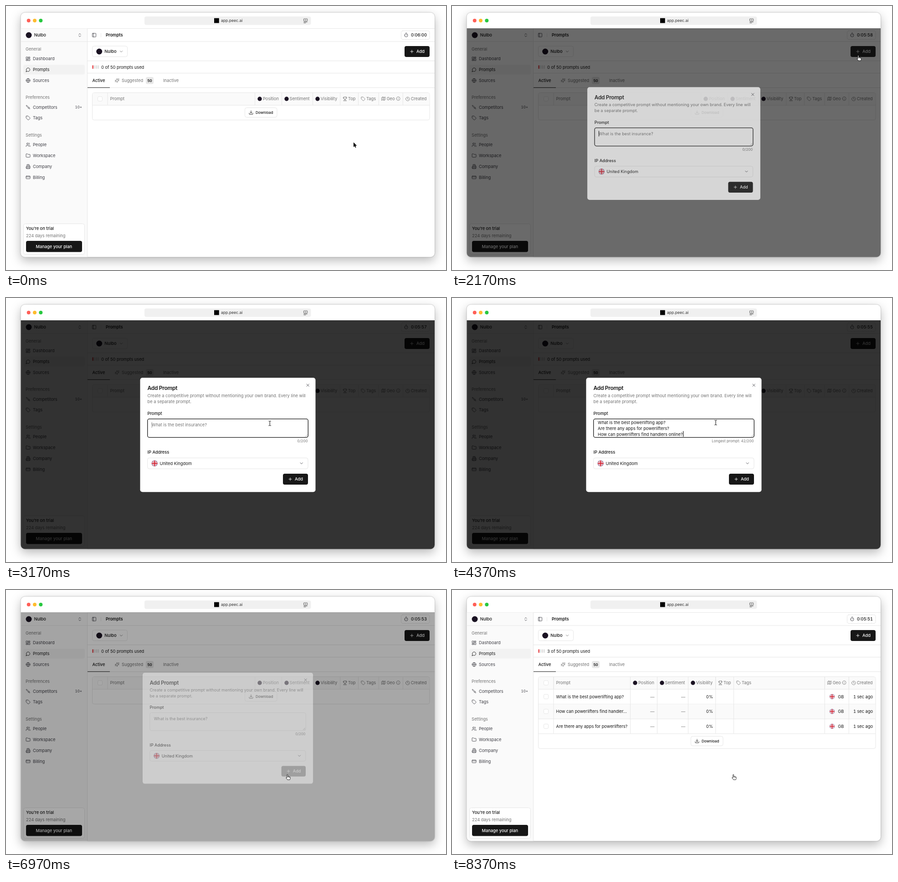
These frames come from a looping animation (966 px wide and 580 px high, 8.4 s). An HTML page:

```html
<!DOCTYPE html>
<html lang="en">
<head>
<meta charset="utf-8">
<title>Add prompts</title>
<style>
  html, body { margin: 0; width: 100%; height: 100%; overflow: hidden; background: #fff; }
  svg { display: block; width: 100%; height: 100%; }
  text { font-family: Inter, "Open Sans", sans-serif; white-space: pre; }
  .num { font-variant-numeric: tabular-nums; }
  .shadow { filter: drop-shadow(0 0 .8px rgba(0,0,0,.35)) drop-shadow(0 8px 11px rgba(0,0,0,.27)); }
</style>
</head>
<body>
<svg id="stage" viewBox="0 0 966 580"></svg>
<script>
const LOOP = 8400, BRAND = 'Nulbo';
const INK = '#171717', BODY = '#3f3f46', MUTED = '#737373', LINE = '#e6e6e6', AVATAR = '#1a1222';

const ICONS = {
  dash: 'M3 3h7v9H3zM14 3h7v5h-7zM14 12h7v9h-7zM3 16h7v5H3z',
  chat: 'M7.9 20A9 9 0 1 0 4 16.1L2 22Z',
  globe: 'M2 12a10 10 0 1 0 20 0a10 10 0 1 0-20 0h20M12 2a14.5 14.5 0 0 0 0 20a14.5 14.5 0 0 0 0-20',
  sword: 'M14.5 17.5 3 6V3h3l11.5 11.5M13 19l6-6M16 16l4 4M19 21l2-2',
  tag: 'M12.6 2.6A2 2 0 0 0 11.2 2H4a2 2 0 0 0-2 2v7.2a2 2 0 0 0 .6 1.4l8.7 8.7a2.4 2.4 0 0 0 3.4 0l6.6-6.6a2.4 2.4 0 0 0 0-3.4zM7.5 7.5h.01',
  users: 'M16 21v-2a4 4 0 0 0-4-4H6a4 4 0 0 0-4 4v2M5 7a4 4 0 1 0 8 0a4 4 0 1 0-8 0M22 21v-2a4 4 0 0 0-3-3.9M16 3.1a4 4 0 0 1 0 7.8',
  folder: 'M20 20a2 2 0 0 0 2-2V8a2 2 0 0 0-2-2h-7.9a2 2 0 0 1-1.7-.9l-.8-1.2A2 2 0 0 0 7.9 3H4a2 2 0 0 0-2 2v13a2 2 0 0 0 2 2Z',
  office: 'M6 22V4a2 2 0 0 1 2-2h8a2 2 0 0 1 2 2v18ZM6 12H4a2 2 0 0 0-2 2v6a2 2 0 0 0 2 2h2M18 9h2a2 2 0 0 1 2 2v9a2 2 0 0 1-2 2h-2M10 6h4M10 10h4M10 14h4M10 18h4',
  card: 'M4 5h16a2 2 0 0 1 2 2v10a2 2 0 0 1-2 2H4a2 2 0 0 1-2-2V7a2 2 0 0 1 2-2ZM2 10h20',
  panel: 'M5 3h14a2 2 0 0 1 2 2v14a2 2 0 0 1-2 2H5a2 2 0 0 1-2-2V5a2 2 0 0 1 2-2ZM9 3v18',
  timer: 'M10 2h4M12 14l3-3M4 14a8 8 0 1 0 16 0a8 8 0 1 0-16 0',
  plus: 'M5 12h14M12 5v14',
  down: 'M6 9l6 6 6-6',
  sort: 'M7 15l5 5 5-5M7 9l5-5 5 5',
  spark: 'M9.9 15.5A2 2 0 0 0 8.5 14.1l-6.1-1.6a.5.5 0 0 1 0-1L8.5 9.9A2 2 0 0 0 9.9 8.5l1.6-6.1a.5.5 0 0 1 1 0l1.6 6.1a2 2 0 0 0 1.4 1.4l6.1 1.6a.5.5 0 0 1 0 1l-6.1 1.6a2 2 0 0 0-1.4 1.4l-1.6 6.1a.5.5 0 0 1-1 0zM20 3v4M22 5h-4M4 17v2M5 18H3',
  save: 'M21 15v4a2 2 0 0 1-2 2H5a2 2 0 0 1-2-2v-4M7 10l5 5 5-5M12 15V3',
  trophy: 'M6 9H4.5a2.5 2.5 0 0 1 0-5H6M18 9h1.5a2.5 2.5 0 0 0 0-5H18M4 22h16M10 14.7V17c0 .6-.5 1-1 1.2C7.9 18.8 7 20.2 7 22M14 14.7V17c0 .6.5 1 1 1.2C16.1 18.8 17 20.2 17 22M18 2H6v7a6 6 0 0 0 12 0V2Z',
  map: 'M3 6l6-3 6 3 6-3v15l-6 3-6-3-6 3ZM9 3v15M15 6v15',
  info: 'M2 12a10 10 0 1 0 20 0a10 10 0 1 0-20 0M12 16v-4M12 8h.01',
  clock: 'M2 12a10 10 0 1 0 20 0a10 10 0 1 0-20 0M12 6v6l4 2',
  close: 'M18 6 6 18M6 6l12 12'
};

// Markup helpers; text and icons are placed by their vertical centre.
const text = (x, cy, s, { fill = INK, size = 9.28, w = 400, anchor = 'start', extra = '' } = {}) =>
  `<text x="${x}" y="${cy + size * .364}" font-size="${size}" font-weight="${w}" fill="${fill}" text-anchor="${anchor}" ${extra}>${s}</text>`;
const rect = (x, y, w, h, fill, r = 0, extra = '') =>
  `<rect x="${x}" y="${y}" width="${w}" height="${h}" rx="${r}" fill="${fill}" ${extra}/>`;
const box = (x, y, w, h, r = 4, extra = '') => rect(x, y, w, h, '#fff', r, `stroke="${LINE}" ${extra}`);
const dot = (x, y, r, fill) => `<circle cx="${x}" cy="${y}" r="${r}" fill="${fill}"/>`;
const hline = (x1, x2, y, c = LINE) => `<path d="M${x1} ${y}H${x2}" stroke="${c}"/>`;
const vline = (x, y1, y2, c = LINE) => `<path d="M${x} ${y1}V${y2}" stroke="${c}"/>`;
const icon = (name, cx, cy, color = BODY, size = 10.6) =>
  `<path d="${ICONS[name]}" transform="translate(${cx - size / 2} ${cy - size / 2}) scale(${size / 24})" fill="none" stroke="${color}" stroke-width="2" stroke-linecap="round" stroke-linejoin="round"/>`;
const flag = (cx, cy, r) => `<g transform="translate(${cx} ${cy}) scale(${r / 10})" clip-path="url(#disc)">
  <rect x="-10" y="-10" width="20" height="20" fill="#25408f"/>
  <path d="M-10-10 10 10M10-10-10 10" stroke="#fff" stroke-width="4.4"/>
  <path d="M-10-10 10 10M10-10-10 10" stroke="#d22f3f" stroke-width="1.6"/>
  <path d="M-10 0H10M0-10V10" stroke="#fff" stroke-width="6.4"/>
  <path d="M-10 0H10M0-10V10" stroke="#d22f3f" stroke-width="3.6"/></g>`;
const addButton = (id, x, y) => `<g id="${id}">${rect(x, y, 55, 24, INK, 4)}
  ${icon('plus', x + 16, y + 12, '#fff')}${text(x + 26, y + 12, 'Add', { fill: '#fff', w: 500 })}</g>`;

function chrome() {
  return rect(32.5, 14.5, 908.5, 537, '#fff', 9, 'class="shadow"') +
    ['#ff5f57', '#febc2e', '#28c840'].map((c, i) => dot(49.7 + i * 13.3, 32, 4, c)).join('') +
    rect(304, 23, 365.5, 18.5, '#f0f0f0', 4) + rect(457, 26.7, 10.7, 10.7, '#000') +
    text(472, 32, 'app.peec.ai', { size: 8.6, fill: '#333' }) +
    '<path d="M654.5 28h6.2a1 1 0 0 1 1 1v3.4a1 1 0 0 1-1 1h-6.2a1 1 0 0 1-1-1V29a1 1 0 0 1 1-1ZM655.5 30.7h4.2M653.5 35.2h8.2M653.5 37.2h5" fill="none" stroke="#555" stroke-width=".9"/>';
}

function sidebar() {
  const head = (y, s) => text(43, y, s, { fill: MUTED });
  const item = (y, ic, s, c = BODY) => icon(ic, 48.5, y, c) + text(59, y, s, { fill: c });
  return rect(32, 49.5, 146.5, 503, '#fafafa') + vline(178.5, 49.5, 552) + hline(32, 178.5, 78) +
    dot(50, 64, 6.5, AVATAR) + text(61.7, 64, BRAND, { w: 500 }) + icon('sort', 162, 64) +
    head(94.5, 'General') + rect(38, 129, 135, 21.5, '#f2f2f2', 4) +
    item(116, 'dash', 'Dashboard') + item(140, 'chat', 'Prompts', INK) + item(163.7, 'globe', 'Sources') +
    head(201, 'Preferences') + item(222.3, 'sword', 'Competitors') +
    text(167, 222.3, '10+', { size: 8, anchor: 'end', fill: BODY, extra: 'class="num"' }) +
    item(246, 'tag', 'Tags') + head(283.5, 'Settings') + item(304.8, 'users', 'People') +
    item(328.7, 'folder', 'Workspace') + item(352.6, 'office', 'Company') + item(376.5, 'card', 'Billing') +
    box(38.5, 478.5, 134, 67) + text(44, 489, 'You’re on trial', { w: 500 }) +
    text(44, 504.3, '224 days remaining', { fill: MUTED }) +
    rect(44, 516, 123, 24.5, INK, 4) + text(105.3, 528.2, 'Manage your plan', { fill: '#fff', w: 500, anchor: 'middle' });
}

function mainTop() {
  return icon('panel', 193.5, 64) + vline(208.5, 59.5, 68.5) + text(219, 64, 'Prompts', { w: 600 }) +
    rect(867.5, 54.5, 62.5, 19, '#fff', 4, 'stroke="#d4d4d4" stroke-dasharray="2 1.4"') +
    icon('timer', 878.5, 63.5) + text(924, 64, '0:06:00', { w: 500, anchor: 'end', extra: 'id="timer" class="num"' }) +
    [78, 120.5, 147.5, 179.5].map(y => hline(179, 941, y)).join('') +
    box(189.5, 88, 77, 23.5) + dot(204.7, 100, 6.5, AVATAR) + text(216.3, 100, BRAND, { w: 500 }) +
    icon('down', 253, 100, MUTED) + addButton('mainAdd', 875, 88) +
    [0, 1, 2, 3].map(i => rect(189.5 + i * 3.9, 130.3, 2.5, 7.8, i ? '#dedede' : '#e5484d', 1)).join('') +
    text(209, 134.3, '0 of 50 prompts used', { extra: 'id="used"' }) +
    text(189.5, 163.7, 'Active', { w: 500 }) + hline(179, 228, 179.3, INK) +
    icon('spark', 243.8, 163.7, MUTED) + text(254, 163.7, 'Suggested', { fill: MUTED }) +
    rect(307, 156, 17, 15.5, '#e8e8e8', 3.5) + text(315.5, 163.7, '50', { size: 8, w: 600, anchor: 'middle' }) +
    text(345, 163.7, 'Inactive', { fill: MUTED });
}

const ROW = 32.6;
function table() {
  const label = (x, s, cy = 204) => text(x, cy, s, { fill: MUTED });
  const check = cy => box(201.5, cy - 5, 10, 10, 2.5);
  const prompts = ['What is the best powerlifting app?', 'How can powerlifters find handler…', 'Are there any apps for powerlifters?'];
  const rows = prompts.map((s, i) => {
    const cy = 234.2 + i * ROW, end = { anchor: 'end' };
    return (i === 1 ? rect(190, 250.6, 739.5, ROW, '#fafafa') : '') + check(cy) + text(228.5, cy, s) +
      text(444.5, cy, '—', { ...end, fill: MUTED }) + text(512.3, cy, '—', { ...end, fill: MUTED }) +
      text(573, cy, '0%', end) + flag(834.5, cy, 5.6) + text(847.3, cy, 'GB') +
      text(924, cy, '1 sec ago', { ...end, extra: 'class="num age"' }) + hline(190, 930, 218 + (i + 1) * ROW);
  }).join('');
  const lines = y => [546.5, 605.5, 673.5, 733.8, 773.5].map(x => vline(x, 191, y)).join('');
  const fixed = y => [223, 818.3, 871.3].map(x => vline(x, 191, y)).join('');
  return rect(189.5, 190.5, 740.5, 60, 'none', 4, `id="frame" stroke="${LINE}"`) +
    rect(190, 191, 739.5, 27, '#fafafa', 3.5) + hline(190, 930, 218) + check(204) + label(228.5, 'Prompt') +
    `<g id="rows">${rows}${fixed(218 + 3 * ROW)}<g transform="translate(-155 0)">${lines(218 + 3 * ROW)}</g></g>` + fixed(218) +
    `<g id="cols">${lines(218)}${[557, 616, 684].map(x => dot(x, 204, 4.7, AVATAR)).join('')}` +
    label(564, 'Position') + label(622.5, 'Sentiment') + label(690.7, 'Visibility') +
    icon('trophy', 744.2, 204, MUTED, 10) + label(751, 'Top') + icon('tag', 784, 204, MUTED, 10) + label(791, 'Tags') + '</g>' +
    icon('map', 828.7, 203.5, MUTED, 10) + label(835.7, 'Geo', 203.7) + icon('info', 861, 203.5, MUTED, 9.6) +
    icon('clock', 881.7, 204.2, MUTED, 9.8) + label(888.7, 'Created') +
    `<g id="download">${box(524.5, 223.5, 70.5, 21)}${icon('save', 538, 234, INK)}${text(548, 234, 'Download', { size: 8, w: 500 })}</g>`;
}

function modal() {
  const lines = ['What is the best powerlifting app?', 'Are there any apps for powerlifters?', 'How can powerlifters find handlers online?'];
  return `<g id="modal">${rect(294.5, 175.3, 385, 251, '#fff', 5)}
    ${text(310.5, 197.7, 'Add Prompt', { size: 12, w: 600, extra: 'letter-spacing="-.3"' })}
    ${icon('close', 662.7, 191.6, BODY)}
    ${text(310.5, 214.2, 'Create a competitive prompt without mentioning your own brand. Every line will', { fill: MUTED })}
    ${text(310.5, 227.6, 'be a separate prompt.', { fill: MUTED })}
    ${text(310.5, 253.5, 'Prompt', { w: 500 })}
    ${box(310.7, 265.7, 352.6, 40.6)}
    ${rect(310.7, 265.7, 352.6, 40.6, 'none', 4, `id="ring" stroke="${INK}" stroke-width="1.3"`)}
    <path d="M657 304.8l4.8-4.8M660 304.8l1.8-1.8" stroke="#888" stroke-width=".7"/>
    <g id="hint">${text(320, 278.8, 'What is the best insurance?', { fill: MUTED })}</g>
    <g id="typed">${lines.map((s, i) => text(320, 273.6 + i * 13.25, s)).join('')}</g>
    <rect id="caret" width="1.1" height="12.4" fill="#000"/>
    ${text(662.5, 313.8, '0/200', { size: 8, fill: MUTED, anchor: 'end', extra: 'id="count"' })}
    ${text(310.5, 338.6, 'IP Address', { w: 500 })}
    ${box(310.7, 351.3, 352.3, 24)}${flag(326.2, 363.2, 6.7)}${text(337.5, 363.2, 'United Kingdom')}
    ${icon('down', 648.7, 363.2, BODY)}${addButton('modalAdd', 608, 386)}</g>`;
}

const cursors = `<g id="cursor">
  <path id="arrow" d="M0 0V10.4L2.3 8.2 3.9 11.8 5.6 11.1 4.1 7.6H7.2Z" fill="#000" stroke="#fff" stroke-width=".8" paint-order="stroke"/>
  <g id="hand" stroke="#000" stroke-width=".8" stroke-linejoin="round">
    <path d="M-1 1a1 1 0 0 1 2 0V4.3Q2.6 3.6 3 4.8 4.4 4.1 4.8 5.4 6.3 5 6.3 6.6V8.5Q6.2 10 5.3 11.6H.2Q-.6 9.8-2.9 7.6-3.2 6-1 7.2Z" fill="#fff"/>
    <path d="M1 4.3v2M3 4.8v1.7M4.8 5.4v1.3" fill="none"/></g>
  <path id="beam" d="M-2.6-5.2Q-.3-5.2 0-4.2 .3-5.2 2.6-5.2M0-4.2V4.2M-2.6 5.2Q-.3 5.2 0 4.2 .3 5.2 2.6 5.2" fill="none" stroke="#000"/></g>`;

const stage = document.getElementById('stage');
stage.innerHTML = `<defs><clipPath id="win"><rect x="32.5" y="14.5" width="908.5" height="537" rx="9"/></clipPath>
  <clipPath id="disc"><circle r="10"/></clipPath></defs>${chrome()}
  <g clip-path="url(#win)">${hline(32, 941, 49.5)}${sidebar()}${mainTop()}${table()}
  ${rect(32, 49, 910, 504, '#000', 0, 'id="shade"')}</g>${modal()}${cursors}`;

const $ = {};
stage.querySelectorAll('[id]').forEach(el => $[el.id] = el);
const ages = [...stage.querySelectorAll('.age')];
const set = (el, name, v) => el.setAttribute(name, v);
const show = (el, on) => set(el, 'display', on ? 'inline' : 'none');
const ramp = (t, a, b) => Math.min(1, Math.max(0, (t - a) / (b - a)));
const smooth = u => u * u * (3 - 2 * u);
const easeOut = u => 1 - (1 - u) ** 2.3;
const inside = (x, y, l, t, w, h) => x >= l && x <= l + w && y >= t && y <= t + h;

const PASTE = 4330, SUBMIT = 6530, CLOSE = 6960, LOADED = 7030;
const PATH = [[70, 763, 299.5], [900, 876, 125], [1630, 892, 108.5], [2270, 892, 108.5],
  [2870, 588, 346], [3200, 579, 273.8], [5170, 579, 273.8], [6000, 617.7, 405.3]];

function pointer(t) {
  let [, x, y] = PATH[0];
  for (let i = 1; i < PATH.length; i++) {
    const [a] = PATH[i - 1], [b, px, py] = PATH[i], u = smooth(ramp(t, a, b));
    x += (px - x) * u;
    y += (py - y) * u;
  }
  return [x, y];
}

function caretAlpha(t) {
  const since = t - (t < 3200 ? 2250 : t < PASTE ? 3200 : PASTE);
  if (since < 500) return 1;
  const p = (since - 500) % 1000;
  return p < 370 ? 1 - ramp(p, 0, 150) : ramp(p, 370, 500);
}

function openness(t) {
  if (t < 2130) return 0;
  return t < CLOSE ? easeOut(ramp(t, 2084, 2284)) : 1 - easeOut(ramp(t, 6910, 7110));
}

const tint = (el, u) => {
  const v = Math.round(23 + 24 * u);
  set(el.firstElementChild, 'fill', `rgb(${v},${v},${v})`);
};

function draw(t) {
  const left = 360 - Math.floor((t + 630) / 1000);
  $.timer.textContent = `0:0${Math.floor(left / 60)}:${String(left % 60).padStart(2, '0')}`;

  const loaded = t >= LOADED, drop = loaded ? 3 * ROW : 0;
  $.used.textContent = `${loaded ? 3 : 0} of 50 prompts used`;
  show($.rows, loaded);
  set($.cols, 'transform', `translate(${loaded ? -155 : 0} 0)`);
  set($.download, 'transform', `translate(0 ${drop})`);
  set($.frame, 'height', 60 + drop);
  ages.forEach(el => el.textContent = `${t < 7930 ? 0 : 1} sec ago`);

  const p = openness(t), k = .95 + .05 * p;
  set($.shade, 'opacity', .8 * p);
  show($.modal, p > 0);
  set($.modal, 'opacity', p);
  set($.modal, 'transform', `translate(487 ${300.8 + 5 * (1 - p)}) scale(${k}) translate(-487 -300.8)`);

  const typed = t >= PASTE && t < CLOSE, sent = ramp(t, SUBMIT, 6670);
  show($.typed, typed);
  show($.hint, !typed);
  $.count.textContent = typed ? 'Longest prompt: 42/200' : '0/200';
  set($.ring, 'opacity', 1 - sent);
  set($.caret, 'x', typed ? 507.2 : 319.7);
  set($.caret, 'y', typed ? 292.4 : 272.6);
  set($.caret, 'opacity', t < SUBMIT ? caretAlpha(t) : 0);
  tint($.mainAdd, ramp(t, 1430, 1580) * (1 - ramp(t, 2130, 2280)));
  tint($.modalAdd, ramp(t, 5790, 5940));
  set($.modalAdd, 'opacity', 1 - .5 * sent);

  const [x, y] = pointer(t);
  const hand = inside(x, y, 875, 88, 55, 24) || inside(x, y, 608, 386, 55, 24);
  const beam = t > 2270 && inside(x, y, 310, 265, 354, 42);
  set($.cursor, 'transform', `translate(${x} ${y})`);
  show($.hand, hand);
  show($.beam, beam);
  show($.arrow, !hand && !beam);
}

const start = performance.now();
function tick() {
  draw((performance.now() - start) % LOOP);
  requestAnimationFrame(tick);
}
tick();
</script>
</body>
</html>
```
